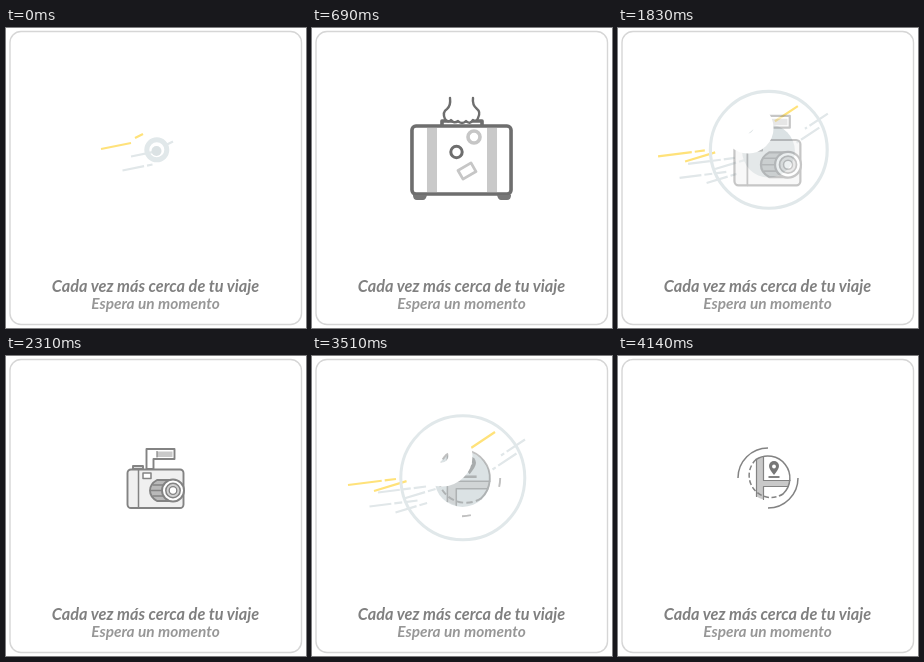
An HTML page for the animation above (4170 ms loop, 300x300 px).

```html
<!DOCTYPE html>
<html lang="es">
<head>
<meta charset="utf-8">
<style>
html, body { margin: 0; width: 100%; height: 100%; overflow: hidden; background: #fff; }
svg { display: block; width: 100vw; height: 100vh; }
text { font-family: Lato, sans-serif; font-weight: 700; font-style: italic; text-anchor: middle; }
.icon { fill: none; stroke: #6e6e6e; stroke-linejoin: round; stroke-linecap: round; }
.icon.soft { stroke: #838383; }
.pale { stroke: #c6c6c6; }
.fill { fill: #c9c9c9; stroke: none; }
.dark { fill: #777; stroke: none; }
.white { fill: #fff; }
.flat { stroke-linecap: butt; }
</style>
</head>
<body>
<svg viewBox="0 0 300 300">
  <rect width="300" height="300" fill="#fff"/>
  <rect x="4" y="3.5" width="291.5" height="293" rx="11" fill="#fff" stroke="#d6d6d6" stroke-width="1.4"/>
  <text x="149.5" y="264" font-size="16.3" fill="#808080">Cada vez más cerca de tu viaje</text>
  <text x="149.5" y="281" font-size="15.4" fill="#979797">Espera un momento</text>

  <g id="streaks" fill="none" stroke-width="2.2"></g>
  <circle id="ring" cx="150.8" cy="121.8" fill="none" stroke="#e1e8ea"/>
  <circle id="disc" cx="150.5" cy="123" fill="#dbe2e4"/>

  <g class="icon" data-unit=".965" stroke-width="3.6">
    <path d="M130 97v-4h40v4"/>
    <path class="white" stroke-width="2.4" d="M138 70q1 8-3 11q-5 3-2 10q3 4 6 1q3 4 7 1q4 4 8 0q4 4 7-1q4 2 5-2q3-6-1-9q-5-4-4-11"/>
    <rect class="white" x="100" y="98" width="99" height="68" rx="4"/>
    <path class="fill" d="M115 100h10v64h-10zM175 100h10v64h-10z"/>
    <path class="dark" d="M101 167h14q-1 5-4 5h-6q-4 0-4-5M185 167h14q0 5-4 5h-6q-3 0-4-5"/>
    <circle class="pale white" cx="162" cy="109" r="6"/>
    <circle class="white" cx="144.5" cy="124" r="5.7" stroke-width="3"/>
    <rect class="pale" x="147.5" y="138" width="15" height="10" transform="rotate(-30 155 143)" stroke-width="2.8"/>
  </g>

  <g class="icon" data-unit="1" stroke-width="3.9">
    <path fill="#c9c9c9" d="M122.500 83l10-3l33 25l-16 7z"/>
    <path class="white" d="M105 119l8-2l8 7l46-18q18-6 27 0q4 4-1 8l-20 9l-12 39l-7 3l-2-36l-39 12q-3 1-4-2z"/>
    <path class="flat" stroke-width="4.2" stroke-dasharray="5.5 4" d="M127 129l43-15"/>
    <path stroke-width="3" d="M178 111l5-2"/>
  </g>

  <g class="icon soft" data-unit=".56" stroke-width="1.9">
    <path class="white" d="M140.5 113v-20h28v10h-21v10z"/>
    <path class="fill" d="M151 95.5h15.5v5.5h-15.5z"/>
    <path d="M151 95.5v5.5" stroke-width="1.2"/>
    <path fill="#dedede" d="M127 113v-3h10v3z"/>
    <rect x="121.5" y="113.5" width="56" height="38.5" rx="3.5" fill="#f0f0f0"/>
    <path d="M132.5 114v38" stroke-width="1.5"/>
    <rect class="white" x="137" y="117" width="8" height="5.5" stroke-width="1.5"/>
    <path fill="#b9b9b9" d="M167 124h-16q-7 4-7 10.5t7 10.5h16z"/>
    <path d="M147 129h12M145 134.500h12M147 140h12" stroke-width="1.4"/>
    <circle class="white" cx="167" cy="134.5" r="11"/>
    <circle cx="167" cy="134.5" r="7.2" fill="#d2d2d2" stroke-width="1.5"/>
    <circle class="white" cx="167" cy="134.5" r="3.8" stroke-width="1.3"/>
  </g>

  <g class="icon" data-unit="1" stroke-width="3.4">
    <circle class="white" cx="150" cy="122" r="40"/>
    <circle class="pale flat" cx="150" cy="122" r="30" stroke-width="2.2" stroke-dasharray="11.7 4"/>
    <circle class="flat" cx="150" cy="122" r="21" stroke="#8a8a8a" stroke-width="4" stroke-dasharray="7.5 5.7"/>
    <g id="needle" stroke-width="2.2">
      <path fill="#c9c9c9" d="M150 88l8 34l-8 34l-8-34z"/>
      <circle class="white" cx="150" cy="122" r="6"/>
    </g>
  </g>

  <g class="icon soft" data-unit=".55" stroke-width="1.5">
    <path class="fill" d="M138.500 103.500q3-2.500 7-3v43q-4-1-7-3zM145.500 124.500h26.500l-1.500 6h-25z"/>
    <path d="M138.500 103.500v37M145.500 100.500v24h26.500M145.500 143.500v-13h25" stroke-width="1.2"/>
    <path d="M138 103.500A22 22 0 0 1 165 138"/>
    <path class="flat" stroke-dasharray="5 2.5" d="M138 103.500A22 22 0 0 0 165 138"/>
    <path class="arc flat" pathLength="100" d="M120 122a30 30 0 0 1 30-30"/>
    <path class="arc flat" pathLength="100" d="M180 122a30 30 0 0 1-30 30"/>
    <path class="dark" d="M156 119q-5-6-5-9a5 5 0 0 1 10 0q0 3-5 9z"/>
    <circle class="white" cx="156" cy="110.5" r="1.9" stroke="none"/>
    <path class="flat" d="M150.500 121h11" stroke-width="2"/>
  </g>

  <circle id="wave" cx="130" cy="100" fill="none" stroke="#fff"/>
</svg>
<script>
const LOOP = 4170, STEP = 30, ICON_TIME = LOOP / 5;
const CAMERA = 2, COMPASS = 3;
const el = id => document.getElementById(id);
const set = (node, attrs) => {
  for (const key in attrs) node.setAttribute(key, attrs[key]);
};

// Interpolates rows of [time, ...values]; null outside their span.
function track(rows, p) {
  const last = rows.length - 1;
  if (p < rows[0][0] || p > rows[last][0]) return null;
  let i = 0;
  while (i < last - 1 && p > rows[i + 1][0]) i++;
  const a = rows[i], b = rows[i + 1], k = (p - a[0]) / (b[0] - a[0]);
  return a.slice(1).map((v, j) => v + (b[j + 1] - v) * k);
}

const ringTrack = [[0, 10, 5], [174, 62, 3], [348, 88.3, 5], [366, 100, 2.2], [402, 110, 0]];
const waveTrack = [[100, 0, 0], [174, 18.5, 24], [348, 90, 6], [366, 100, 6], [420, 118, 0]];
const discTrack = [[0, 5], [174, 28], [270, 0]];

// Each group holds a yellow streak and two grey ones at fixed offsets.
const offsets = [[0, 0], [30, 7.5], [21.5, 21.5]];
const groupTracks = [
  [[0, 95, 121, 125, 115], [174, 36, 129, 84, 123], [290, -12, 136, 10, 133]],
  [[80, 102, 123, 112, 120], [174, 62, 135, 95, 125], [348, 8, 151, 13, 149.5], [410, -22, 158, -18, 157]],
  [[0, 137, 106, 129, 110], [174, 183, 76, 159, 92], [348, 237.500, 39.500, 233, 42.500], [410, 266, 21, 262, 24]]
];
const streaks = groupTracks.flatMap(rows => offsets.map(([dx, dy], i) => {
  const path = document.createElementNS("http://www.w3.org/2000/svg", "path");
  set(path, { stroke: i ? "#e1e7e9" : "#ffe27a", "stroke-dasharray": i ? "22 3 8 3" : "34 3" });
  el("streaks").append(path);
  return { path, rows, dx, dy };
}));

const icons = [...document.querySelectorAll(".icon")];
const arcs = document.querySelectorAll(".arc");

function iconScale(index, p) {
  if (p < 300) return 1 - 0.3 * ((300 - p) / 126) ** 1.4;
  if (p < 606) return 1;
  if (index === CAMERA) return Math.max(0.56, 1 - 0.44 * (p - 606) / 36);
  return 1 - 0.45 * ((p - 606) / 198) ** 3;
}

function drawCircle(id, rows, p) {
  const [r, width = 0] = track(rows, p) || [0];
  set(el(id), { r, "stroke-width": width });
}

function draw(time) {
  const t = Math.floor(time % LOOP / STEP) * STEP;
  const current = Math.floor(t / ICON_TIME), p = t - current * ICON_TIME;

  drawCircle("ring", ringTrack, p);
  drawCircle("wave", waveTrack, p);
  drawCircle("disc", discTrack, p);

  for (const { path, rows, dx, dy } of streaks) {
    const at = track(rows, p);
    set(path, { d: at ? `M${at[0] + dx} ${at[1] + dy}L${at[2] + dx} ${at[3] + dy}` : "" });
  }

  icons.forEach((icon, i) => {
    const shown = i === current && p > 110;
    icon.style.display = shown ? "" : "none";
    if (!shown) return;
    const scale = Math.max(0, iconScale(i, p)) / icon.dataset.unit;
    set(icon, {
      transform: `translate(150 122) scale(${scale}) translate(-150 -122)`,
      opacity: Math.min(1, 0.5 + (p - 174) / 250)
    });
  });
  if (current === COMPASS) {
    set(el("needle"), { transform: `rotate(${-2 + 25 * Math.sin((p - 348) / 140)} 150 122)` });
  }

  // The map's outer arcs grow from both ends until they meet.
  const grown = Math.max(0, Math.min(50, 15 + (p - 174) / 3.6));
  arcs.forEach(arc => set(arc, { "stroke-dasharray": `${grown} ${100 - 2 * grown} ${grown} 0` }));
}

const start = performance.now();
function tick() {
  draw(performance.now() - start);
  requestAnimationFrame(tick);
}
tick();
</script>
</body>
</html>
```
